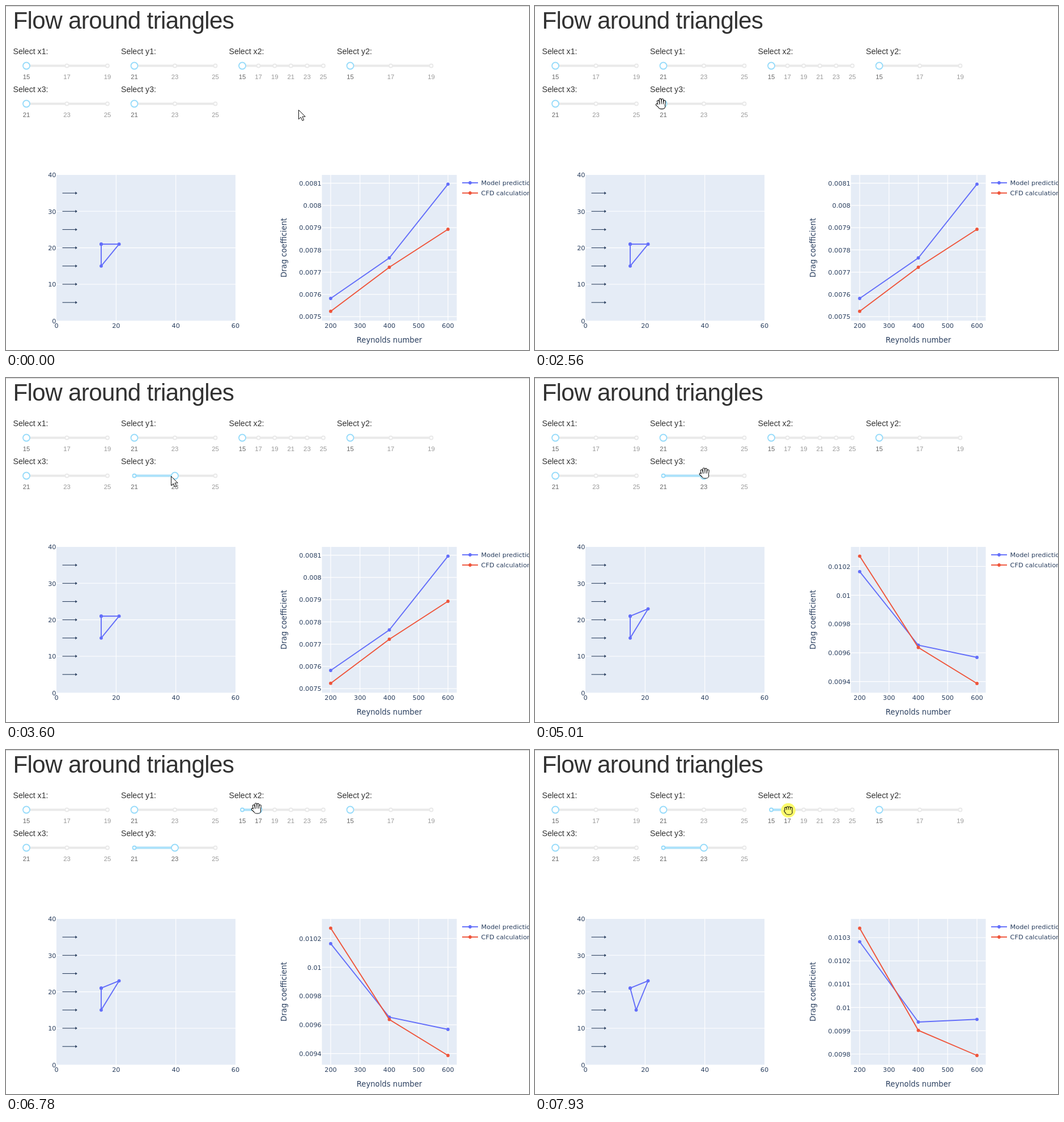
An HTML page with a canvas that plays this animation: 923x607 px, repeating every 7.99 s.

```html
<!DOCTYPE html>
<html lang="en">
<head>
<meta charset="utf-8">
<title>Flow around triangles</title>
<style>
  html, body { margin: 0; width: 100%; height: 100%; overflow: hidden; background: #fff; }
  canvas { display: block; }
</style>
</head>
<body>
<canvas id="stage" width="923" height="607"></canvas>
<script>
const c = document.getElementById('stage').getContext('2d');
const LOOP = 7990;
const SANS = '"Liberation Sans", Arial, sans-serif';
const PLOT = '"DejaVu Sans", Verdana, sans-serif';
const BLUE = '#636efa', RED = '#ef553b', INK = '#2a3f5f', PANEL = '#e5ecf6';
const YELLOW = '#fcfb6c', RAIL = '#e9e9e9', ACTIVE = '#96dbfa';

const easeOut = f => 1 - (1 - f) ** 2;
const smooth = f => f * f * (3 - 2 * f);

// Pointer moves: start, end, number of steps, from x, y, to x, y, easing
const moves = [
  [1190, 1680, 8, 490, 184, 173, 187, smooth],
  [2080, 2700, 10, 178, 186, 225, 173.5, easeOut],
  [2840, 3140, 5, 226, 173, 291, 173, easeOut],
  [5010, 5770, 11, 299.5, 169.5, 417, 105, smooth],
  [5840, 6190, 6, 421, 105, 449, 105, easeOut],
  [6390, 6470, 2, 446, 105, 442.5, 104.5, easeOut],
  [7510, 7720, 4, 443.5, 105, 446.5, 106, easeOut],
  [7930, 7930, 1, 447, 106.5, 447, 106.5, easeOut]
];
const presses = [[2840, 3600], [5840, 6780], [7930, LOOP]];

// Result curves: first tick y, tick spacing, tick labels, then y at Re 200, 400, 600
const results = [
  { top: 312.6, gap: 39.27, ticks: '0.0081 0.008 0.0079 0.0078 0.0077 0.0076 0.0075',
    model: [516, 444.5, 314.3], cfd: [538.7, 461, 394] },
  { top: 332.5, gap: 50.8, ticks: '0.0102 0.01 0.0098 0.0096 0.0094',
    model: [341.7, 471.5, 493], cfd: [314.3, 475.5, 539] },
  { top: 331, gap: 41.1, ticks: '0.0103 0.0102 0.0101 0.01 0.0099 0.0098',
    model: [338.3, 480, 475.3], cfd: [314.5, 494.7, 539] }
];

function pointerAt(t) {
  let pos = [516, 183];
  for (const [start, end, n, x0, y0, x1, y1, ease] of moves) {
    if (t < start) break;
    const last = Math.max(1, n - 1);
    const step = t >= end ? last : Math.floor((t - start) / (end - start) * last + 0.1);
    const f = ease(Math.min(1, step / last));
    pos = [x0 + (x1 - x0) * f, y0 + (y1 - y0) * f];
  }
  return pos;
}

function dragValue(t, [start, end], left, min, max) {
  if (t < start) return min;
  const x = pointerAt(Math.min(t, end))[0];
  return Math.max(min, Math.min(max, min + Math.round((x - left) / 143 * (max - min))));
}

function text(str, x, y, size, { font = PLOT, color = INK, align = 'left', spacing = 0 } = {}) {
  c.font = `${size}px ${font}`;
  c.fillStyle = color;
  c.textAlign = align;
  c.letterSpacing = spacing + 'px';
  c.fillText(str, x, y);
}

function line(points, color, width) {
  c.beginPath();
  points.forEach(p => c.lineTo(...p));
  c.strokeStyle = color;
  c.lineWidth = width;
  c.stroke();
}

function disc(x, y, r, fill, stroke, width) {
  c.beginPath();
  c.arc(x, y, r, 0, 2 * Math.PI);
  c.fillStyle = fill;
  c.fill();
  if (!stroke) return;
  c.strokeStyle = stroke;
  c.lineWidth = width;
  c.stroke();
}

function series(points, color) {
  line(points, color, 1.9);
  points.forEach(([x, y]) => disc(x, y, 2.9, color));
}

function slider(name, col, row, min, max, value, pressed) {
  const x = 36 + 190.5 * col, y = 105.5 + 67 * row;
  const at = v => x + (v - min) / (max - min) * 143;
  text(`Select ${name}:`, x - 23.5, y - 20.5, 14.1, { font: SANS, color: '#323232' });
  c.lineCap = 'round';
  line([[x, y], [x + 143, y]], RAIL, 3.8);
  if (value > min) line([[x, y], [at(value), y]], '#abe2fb', 3.8);
  c.lineCap = 'butt';
  for (let v = min; v <= max; v += 2) {
    const on = v <= value;
    disc(at(v), y, 3, '#fff', on ? ACTIVE : RAIL, 1.8);
    text(v, at(v), y + 23, 11.3, { font: SANS, color: on ? '#666' : '#999', align: 'center' });
  }
  if (pressed) { c.shadowColor = '#57c5f7'; c.shadowBlur = 5; }
  disc(at(value), y, 6, '#fff', ACTIVE, 1.8);
  c.shadowBlur = 0;
  return [at(value), y];
}

function flowPlot(tri) {
  const px = x => 89 + x * 5.267, py = y => 555.3 - y * 6.433;
  c.fillStyle = PANEL;
  c.fillRect(89, 298, 316, 257.3);
  for (let v = 0; v <= 60; v += 20) {
    if (v % 60) line([[px(v), 298], [px(v), 555]], '#fff', 1.1);
    text(v, px(v), 567.5, 11.3, { align: 'center' });
  }
  for (let v = 0; v <= 40; v += 10) {
    if (v % 40) line([[89, py(v)], [405, py(v)]], '#fff', 1.1);
    text(v, 88.5, py(v) + 4.2, 11.3, { align: 'right' });
  }
  for (let v = 5; v <= 35; v += 5) {
    const y = py(v);
    line([[px(2), y], [px(7) - 2, y]], INK, 1.1);
    c.beginPath();
    c.moveTo(px(7), y);
    c.lineTo(px(7) - 3.5, y - 2.6);
    c.lineTo(px(7) - 3.5, y + 2.6);
    c.fillStyle = INK;
    c.fill();
  }
  const corners = tri.map(([x, y]) => [px(x), py(y)]);
  series([...corners, corners[0]], BLUE);
}

function dragPlot({ top, gap, ticks, model, cfd }) {
  const px = re => 573 + (re - 200) * 0.5175;
  c.fillStyle = PANEL;
  c.fillRect(557.5, 298, 238, 257.3);
  for (let re = 200; re <= 600; re += 100) {
    line([[px(re), 298], [px(re), 555]], '#fff', 1.2);
    text(re, px(re), 567.5, 11.3, { align: 'center' });
  }
  ticks.split(' ').forEach((label, i) => {
    const y = top + i * gap;
    line([[557.5, y], [795.5, y]], '#fff', 1.2);
    text(label, 556.8, y + 4.2, 11.3, { align: 'right' });
  });
  [[model, BLUE, 'Model prediction'], [cfd, RED, 'CFD calculation']].forEach(([ys, color, name], i) => {
    series(ys.map((y, k) => [px(200 + 200 * k), y]), color);
    const y = 312 + 18 * i;
    line([[805, y], [833, y]], color, 1.9);
    disc(819, y, 2.9, color);
    text(name, 838.5, y + 4.2, 11.3);
  });
  text('Reynolds number', 676.5, 593.5, 13.2, { align: 'center' });
  c.save();
  c.translate(494.5, 426.5);
  c.rotate(-Math.PI / 2);
  text('Drag coefficient', 0, 0, 13.2, { align: 'center' });
  c.restore();
}

function hand(closed, fill) {
  const tip = closed ? 0.45 : 1;
  const bones = [[-4, 1, -5.5, -6], [-1, 0, -1.7, -9], [2, 0, 2.2, -8.6], [5, 1, 6, -6]]
    .map(([x0, y0, x1, y1]) => [[x0, y0], [x0 + (x1 - x0) * tip, y1 * tip - (closed ? 1 : 0)]]);
  bones.push([[-3, 4], closed ? [-5.5, 1] : [-7.6, 0]]);
  const palm = [[-0.6, 3], [2.6, 3]];
  c.lineCap = 'round';
  for (const [color, grow] of [['#111', 1.1], [fill, -1.1]]) {
    bones.forEach(b => line(b, color, 3.4 + grow));
    line(palm, color, 9 + grow);
  }
  c.lineCap = 'butt';
}

const arrow = new Path2D('M.5 .5V16.8L4.3 13.2 7 19.3 9.7 18.1 7 12.2H12.2Z');

function pointer([x, y], pressed, grabbing) {
  const fill = pressed ? YELLOW : '#fff';
  if (pressed) disc(x, y, 12.8, YELLOW);
  c.save();
  c.translate(x, y);
  if (grabbing) hand(pressed, fill);
  else {
    c.fillStyle = fill;
    c.fill(arrow);
    c.strokeStyle = '#111';
    c.lineWidth = 1;
    c.stroke(arrow);
  }
  c.restore();
}

function draw(t) {
  const pos = pointerAt(t);
  const held = presses.findIndex(([a, b]) => t >= a && t < b);
  const y3 = dragValue(t, presses[0], 226.5, 21, 25);
  const x2 = dragValue(t, presses[1], 417, 15, 25);

  c.fillStyle = '#fff';
  c.fillRect(0, 0, 923, 607);
  c.fillStyle = '#ccc';
  c.fillRect(0, 0, 923, 1);
  text('Flow around triangles', 12.5, 40, 42.2, { font: SANS, color: '#323232', spacing: -0.65 });

  const handles = [
    slider('x1', 0, 0, 15, 19, 15),
    slider('y1', 1, 0, 21, 25, 21),
    slider('x2', 2, 0, 15, 25, x2, held > 0),
    slider('y2', 3, 0, 15, 19, 15),
    slider('x3', 0, 1, 21, 25, 21),
    slider('y3', 1, 1, 21, 25, y3, held === 0)
  ];

  const stage = t < 3870 ? 0 : t < 7110 ? 1 : 2;
  flowPlot([[15, 21], [stage > 1 ? 17 : 15, 15], [21, stage > 0 ? 23 : 21]]);
  dragPlot(results[stage]);

  const grabbing = handles.some(([x, y]) => Math.hypot(x - pos[0], y - pos[1]) < 6.8);
  pointer(pos, held >= 0, grabbing);
}

const begin = performance.now();
function frame() {
  draw((performance.now() - begin) % LOOP);
  requestAnimationFrame(frame);
}
frame();
</script>
</body>
</html>
```
